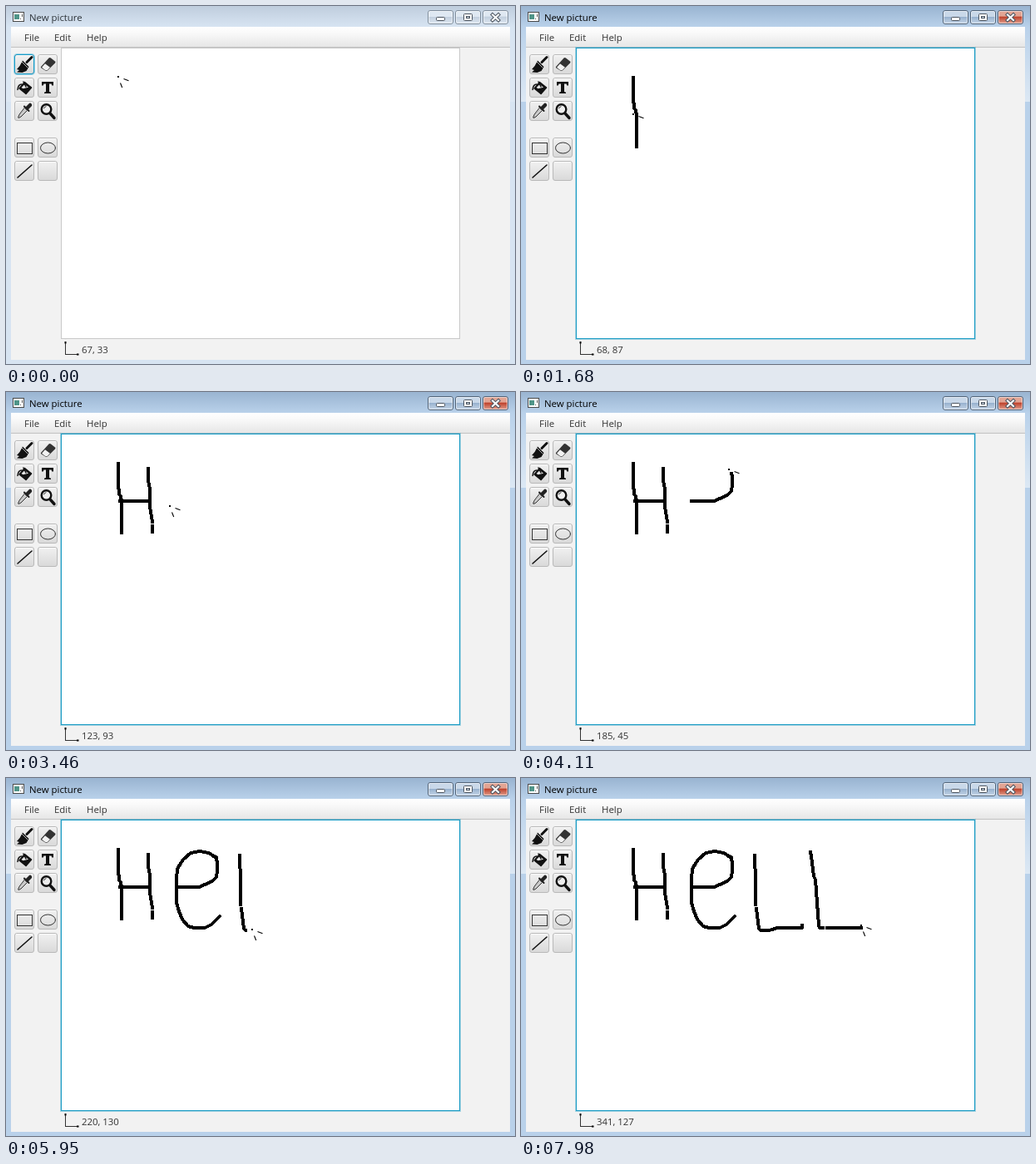
These frames come from a looping animation (612x430 px, 8 s). An HTML page:

```html
<!DOCTYPE html>
<html lang="en">
<head>
<meta charset="utf-8">
<title>New picture</title>
<style>
html, body { margin: 0; width: 612px; height: 430px; overflow: hidden; }
svg {
  display: block;
  --top: #bfcddd; --side: #d7e4f2; --pale: #dde8f4; --btnA: #dfe8f2; --btnB: #c3d0df;
  --closeA: #dfe8f2; --closeB: #c3d0df; --edge: #808e9d; --title: #2d3339; --ring: #c8c8c8;
}
svg.active {
  --top: #99b4d1; --side: #b9d1ea; --pale: #dce8f4; --btnA: #c9d8e9; --btnB: #98b2cf;
  --closeA: #e2a493; --closeB: #c0452f; --edge: #53657a; --title: #000; --ring: #1a9bc4;
}
text { font: 11.4px "Open Sans", "Noto Sans", sans-serif; fill: #333; white-space: pre; }
.s0 { stop-color: var(--top); } .s1 { stop-color: var(--side); } .s2 { stop-color: var(--pale); }
.b0 { stop-color: var(--btnA); } .b1 { stop-color: var(--btnB); }
.c0 { stop-color: var(--closeA); } .c1 { stop-color: var(--closeB); }
.crisp { shape-rendering: crispEdges; }
.glow { opacity: 0; } .active .glow { opacity: .35; }
.active .focus { display: none; }
</style>
</head>
<body>
<svg id="stage" width="612" height="430" viewBox="0 0 612 430">
  <defs>
    <linearGradient id="bar" x2="0" y2="1"><stop class="s0"/><stop class="s1" offset="1"/></linearGradient>
    <linearGradient id="side" x2="0" y2="1"><stop class="s1"/><stop class="s2" offset="1"/></linearGradient>
    <linearGradient id="ctl" x2="0" y2="1"><stop class="b0"/><stop class="b0" offset=".45"/><stop class="b1" offset=".5"/><stop class="b0" offset="1"/></linearGradient>
    <linearGradient id="close" x2="0" y2="1"><stop class="c0"/><stop class="c0" offset=".4"/><stop class="c1" offset=".5"/><stop class="c0" offset="1"/></linearGradient>
    <linearGradient id="menu" x2="0" y2="1"><stop stop-color="#fff"/><stop offset=".35" stop-color="#f8f8f8"/><stop offset="1" stop-color="#e5e5e5"/></linearGradient>
    <linearGradient id="tool" x2="0" y2="1"><stop stop-color="#f1f1f1"/><stop offset="1" stop-color="#d9d9d9"/></linearGradient>
  </defs>

  <rect width="612" height="430" style="fill:var(--side)"/>
  <rect width="612" height="25" fill="url(#bar)"/>
  <rect y="25" width="612" height="90" fill="url(#side)"/>
  <rect x="6" y="25" width="600" height="400" fill="#f2f2f2"/>

  <g class="crisp">
    <rect x="8.5" y="7.5" width="13" height="11" fill="#fff" stroke="#4a4a4a"/>
    <rect x="10" y="10" width="6" height="6" fill="#4f9488"/>
    <path d="M17 15.5h1M19.5 10v3" stroke="#555"/>
  </g>
  <text x="28" y="18" style="fill:var(--title)">New picture</text>

  <g id="controls"></g>
  <rect x="517.500" y="13.500" width="10" height="4" rx="1" fill="#fff" stroke="#4c5560"/>
  <rect x="550.500" y="9.500" width="10" height="8" rx="1" fill="#fff" stroke="#4c5560"/>
  <rect x="553.500" y="12.500" width="4" height="2" fill="#c9d5e2" stroke="#4c5560"/>
  <path d="M585 10.500l7 6.500M592 10.500l-7 6.500" stroke="#4c5560" stroke-width="4.200" stroke-linecap="square"/>
  <path d="M585 10.500l7 6.500M592 10.500l-7 6.500" stroke="#fff" stroke-width="2.200" stroke-linecap="square"/>

  <rect x="6" y="25" width="600" height="25" fill="url(#menu)"/>
  <path class="crisp" d="M6 49.500h600" stroke="#c3c3c3"/>
  <text x="22" y="42">File</text><text x="58" y="42">Edit</text><text x="97" y="42">Help</text>

  <g id="tools"></g>
  <g class="focus" fill="none">
    <rect x="9.500" y="57.500" width="25" height="25" rx="3.500" stroke="#9bd3e8"/>
    <rect x="10.500" y="58.500" width="23" height="23" rx="2.500" stroke="#1a9bc4"/>
  </g>
  <g id="icons" fill="#111" stroke-linecap="round" stroke-linejoin="round">
    <path d="M31 61.500l-6 6" stroke="#111" stroke-width="3"/>
    <path d="M20 65.500l7.500 7.500-3 5-5 2-6.500-.5 3-2.500-3-1 3.500-4z"/>
    <path d="M19 67l7 7" stroke="#ddd" stroke-width=".8"/>
    <path d="M42 73l9.500-10.500q1-1 2.500 0l5 4q1 1 0 2l-8.500 8.500q-1 1-2.500 1l-5.500-3.500q-1-.7-.5-1.500z" fill="#333"/>
    <path d="M43 73.700l4-4.500 6 4.500-3.500 3.500h-2z" fill="#f2f2f2"/>
    <path d="M22.500 91.500l8 6.500-6.500 7.500-8-6.500z" stroke="#111" stroke-width="1.600"/>
    <path d="M22.500 94l4.500 3.700-6.500 1.600-2-1.300z" fill="#e5e5e5"/>
    <path d="M24 97l-3-6M19 94q-4.500 0-5 6.500" fill="none" stroke="#111" stroke-width="1.500"/>
    <path d="M43 91h14v4.500h-1.700l-.8-2H52v9.500l2 .7v1.300h-8v-1.300l2-.7v-9.500h-2.500l-.8 2H43z"/>
    <path d="M29 119l-3.500 3.500" stroke="#222" stroke-width="4.500"/>
    <path d="M22 120.500l5.500 5.500" stroke="#222" stroke-width="2"/>
    <path d="M22.500 122.500l3 3-7.500 7.500-3 1.500-.5-.5 1.500-3.500z" fill="#c9c9c9" stroke="#333"/>
    <circle cx="48.500" cy="124" r="5.800" fill="#eee" stroke="#111" stroke-width="2.400"/>
    <path d="M45.500 123q.5-2 2.500-2.300" fill="none" stroke="#333"/>
    <path d="M53.500 129.500l4.500 5" stroke="#111" stroke-width="3.400"/>
    <rect class="crisp" x="13.500" y="164.500" width="18" height="13" fill="none" stroke="#333"/>
    <ellipse cx="50.500" cy="170.500" rx="9" ry="6.500" fill="none" stroke="#333"/>
    <path d="M14 206l17-15" stroke="#111" stroke-width="1.600"/>
  </g>

  <rect class="glow" x="65.500" y="49.500" width="481" height="351" fill="none" stroke="#1a9bc4"/>
  <rect class="crisp" x="66.500" y="50.500" width="479" height="349" fill="#fff" style="stroke:var(--ring)"/>

  <path id="ink" class="crisp" transform="translate(0 1)" fill="none" stroke="#000" stroke-width="4" stroke-linecap="square" stroke-linejoin="round"/>
  <g id="cursor">
    <rect class="crisp" x="-1" y="-1" width="2" height="2"/>
    <path d="M6.500 2.500l6 2.200M2.500 7.500l2.200 5.500" stroke="#000" stroke-width="1.100"/>
  </g>

  <path class="crisp" d="M71.500 404v14.500h15" fill="none" stroke="#333"/>
  <rect x="70.500" y="403" width="2" height="2.500"/><rect x="85" y="417.500" width="2.500" height="2"/>
  <text id="coords" x="91" y="417"></text>
</svg>
<script>
const $ = id => document.getElementById(id);
const LOOP = 8000, STEP = 59, ORIGIN = [68, 52];

const buttons = [[507, 'ctl'], [540, 'ctl'], [573, 'close']];
$('controls').innerHTML = buttons.map(([x, fill]) =>
  `<rect x="${x + .5}" y="5.5" width="30" height="16" rx="2.5" fill="url(#${fill})" style="stroke:var(--edge)"/>
   <rect x="${x + 1.5}" y="6.5" width="28" height="14" rx="1.5" fill="none" stroke="#fff" stroke-opacity=".5"/>`).join('');
$('tools').innerHTML = [58, 86, 114, 158, 186].flatMap(y => [10, 38].map(x =>
  `<rect x="${x + .5}" y="${y + .5}" width="23" height="23" rx="2.5" fill="url(#tool)" stroke="#b9b9b9"/>
   <path d="M${x + 2} ${y + 1.5}h20" stroke="#fafafa"/>`)).join('');

// Each row: end time, pen down, points that follow the previous end
const rows = [
  [620, 0, '135,85'],
  [1330, 1, '135,115 136,116 136,122 138,124 139,131 139,168'],
  [1390, 0, '139,168'],
  [1620, 0, '135,130'],
  [1860, 0, '135,130'],
  [1920, 0, '137,130'],
  [2250, 1, '172,130'],
  [2640, 0, '171,93'],
  [2749, 0, '170,90'],
  [2750, 0, '171,91'],
  [2808, 1, '171,94'],
  [3170, 1, '171,106 173,115 173,137 176,155'],
  [3172, 0, '176,160'],
  [3230, 1, '176,167'],
  [3460, 0, '197,137'],
  [3580, 0, '205,130'],
  [4051, 1, '232,130 239,127 248,123 253,118 254,110 254,100 253,97'],
  [4110, 1, '253,94 250,93'],
  [4290, 1, '244,89 233,87'],
  [4990, 1, '222,89 213,97 206,108 205,120 205,149 208,159 212,169 219,177 226,179 239,179 247,175 257,165'],
  [5130, 0, '271,130'],
  [5190, 0, '277,108'],
  [5249, 0, '278,104'],
  [5380, 0, '281,92'],
  [5620, 1, '281,100 282,115 282,151'],
  [5622, 0, '283,156'],
  [5950, 1, '286,180 288,182 298,182 302,181'],
  [6200, 1, '308,179 338,179 338,176'],
  [6240, 0, '338,176'],
  [6659, 0, '342,95'],
  [6718, 0, '343,92'],
  [6777, 0, '345,88'],
  [7020, 0, '345,88'],
  [7080, 0, '348,88'],
  [7640, 1, '349,93 352,117 354,121 358,176 359,179 363,179'],
  [7642, 0, '368,179'],
  [7905, 1, '409,179'],
  [7964, 1, '409,177']
];
const restarts = [0, 560, 1390, 1860, 2690, 3520, 4350, 5190, 6010, 6840, 7020];

const dist = (a, b) => Math.hypot(b[0] - a[0], b[1] - a[1]);
let start = 0, last = [135, 85];
const segs = rows.map(([end, pen, text]) => {
  const pts = [last, ...text.split(' ').map(p => p.split(',').map(Number))];
  const len = pts.slice(1).reduce((sum, p, i) => sum + dist(pts[i], p), 0);
  const seg = { start, end, pen, pts, len };
  start = end;
  last = pts[pts.length - 1];
  return seg;
});

function trim({ start, end, pts, len }, t) {
  let left = len * Math.min(1, Math.max(0, (t - start) / (end - start)));
  const out = [pts[0]];
  for (let i = 1; i < pts.length; i++) {
    const a = pts[i - 1], b = pts[i], d = dist(a, b);
    if (d >= left) {
      const f = d ? left / d : 0;
      out.push([a[0] + (b[0] - a[0]) * f, a[1] + (b[1] - a[1]) * f]);
      break;
    }
    out.push(b);
    left -= d;
  }
  return out;
}

function place(t) {
  const seg = segs.find(s => t <= s.end) || segs[segs.length - 1];
  return trim(seg, t).pop().map(Math.round);
}

function draw(t) {
  const base = restarts.filter(r => r <= t).pop();
  const now = base + Math.floor((t - base) / STEP) * STEP;
  const seen = Math.max(0, now - STEP); // ink and label trail the pointer by one step
  const [x, y] = place(now), [lx, ly] = place(seen);
  $('stage').classList.toggle('active', t >= 560);
  $('cursor').setAttribute('transform', `translate(${x} ${y})`);
  $('coords').textContent = `${lx - ORIGIN[0]}, ${ly - ORIGIN[1]}`;
  $('ink').setAttribute('d', segs.filter(s => s.pen && s.start < seen)
    .map(s => 'M' + trim(s, seen).join('L')).join(''));
}

const t0 = performance.now();
function tick() {
  draw((performance.now() - t0) % LOOP);
  requestAnimationFrame(tick);
}
tick();
</script>
</body>
</html>
```
